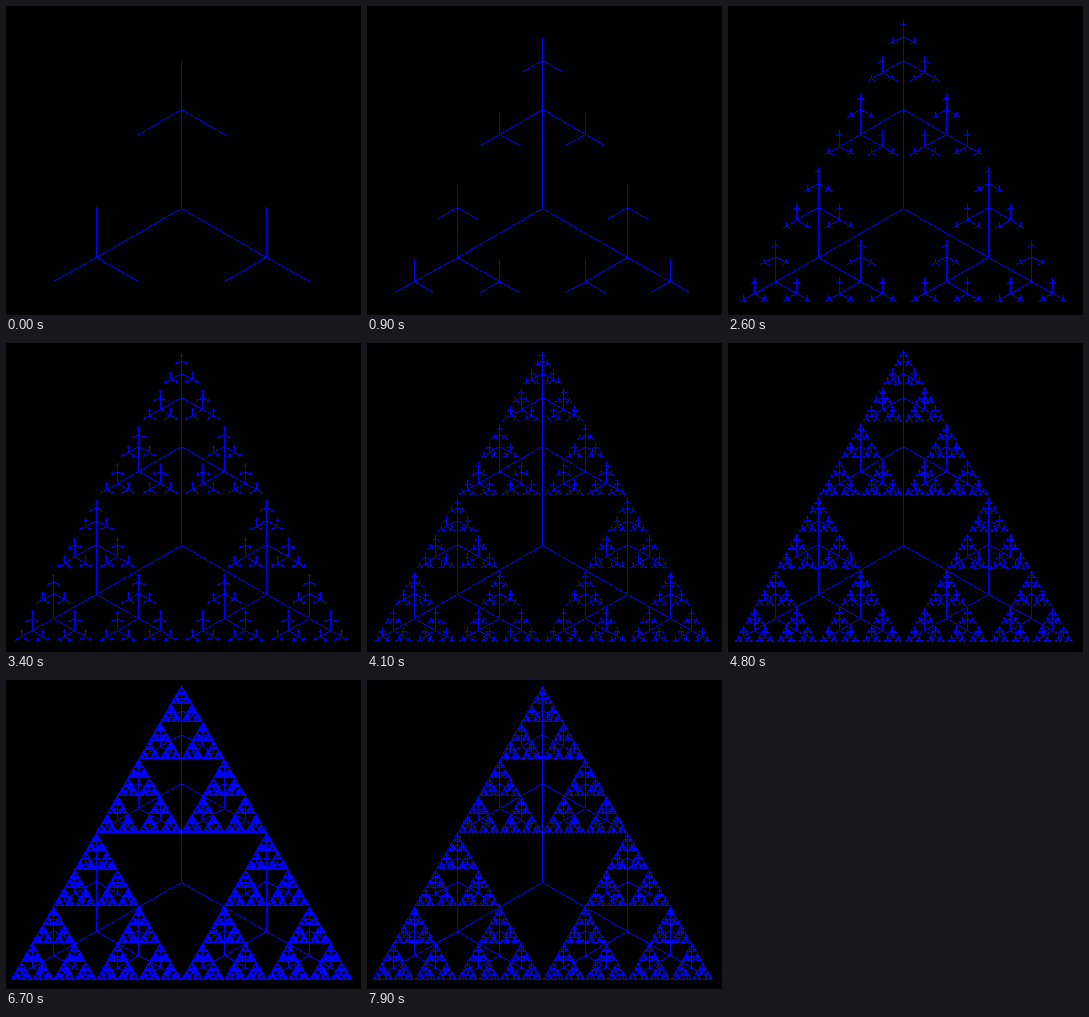
Write an HTML page with a canvas that moves like this. It is 355x309 px and loops after 8 s.

```html
<!DOCTYPE html>
<html>
<head>
<meta charset="utf-8">
<style>
  html, body { margin: 0; width: 100%; height: 100%; overflow: hidden; background: #000; }
  canvas { display: block; }
</style>
</head>
<body>
<canvas width="355" height="309"></canvas>
<script>
const ctx = document.querySelector('canvas').getContext('2d');
const LOOP = 8000, STEP = 100;
const CX = 175.5, CY = 202.3, LENGTH = 98.45;
const DIRECTIONS = [[0, -1], [-0.866, 0.495], [0.866, 0.495]];

// Hard-edged line between whole pixels
function line(x1, y1, x2, y2) {
  const x = Math.floor(x1), y = Math.floor(y1);
  const dx = Math.floor(x2) - x, dy = Math.floor(y2) - y;
  const n = Math.max(Math.abs(dx), Math.abs(dy));
  for (let i = 0; i <= n; i++) {
    const k = n ? i / n : 0;
    ctx.fillRect(Math.round(x + dx * k), Math.round(y + dy * k), 1, 1);
  }
}

// Every tip sprouts three branches of half the length
function grow(x, y, length, level, age, maxLevel) {
  const part = Math.min(1, age - level);
  if (part <= 0 || level > maxLevel) return;
  for (const [ux, uy] of DIRECTIONS) {
    const tipX = x + ux * length * part, tipY = y + uy * length * part;
    line(x, y, tipX, tipY);
    if (part === 1) grow(tipX, tipY, length / 2, level + 1, age, maxLevel);
  }
}

function draw(step) {
  ctx.fillStyle = '#000';
  ctx.fillRect(0, 0, 355, 309);
  ctx.fillStyle = '#00f';
  const age = (step + 20) / 10;
  grow(CX, CY, LENGTH, 0, age, age < 9 ? 8 : 7);
}

let shown = -1;
const start = performance.now();
function tick() {
  const step = Math.floor((performance.now() - start) % LOOP / STEP);
  if (step !== shown) draw(shown = step);
  requestAnimationFrame(tick);
}
tick();
</script>
</body>
</html>
```
